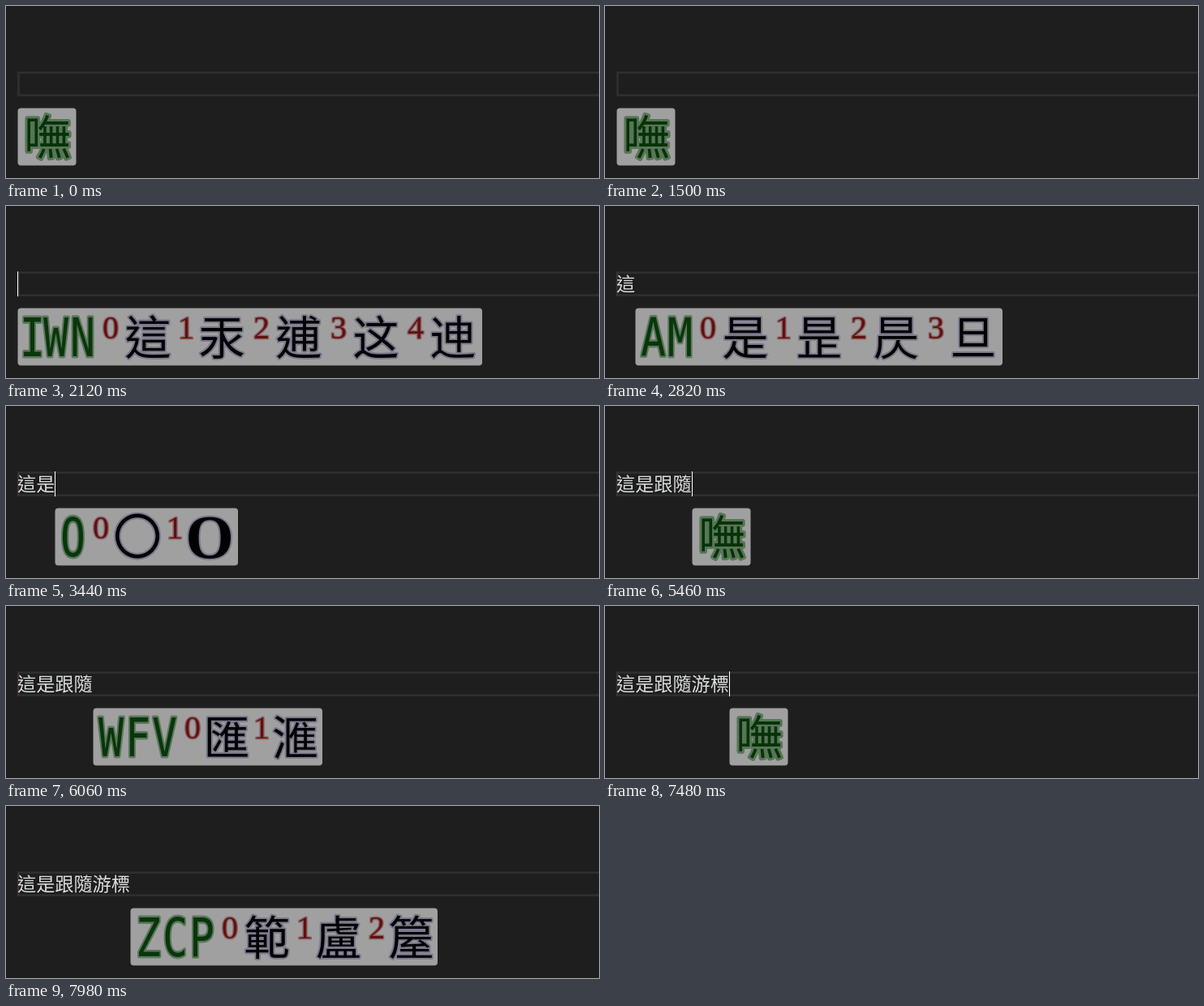
Animation of 731x213 px, one loop 8000 ms. Source, as an HTML page:

```html
<!DOCTYPE html>
<html lang="zh-Hant">
<head>
<meta charset="utf-8">
<style>
html, body { margin: 0; width: 100%; height: 100%; overflow: hidden; background: #1e1e1e; }
svg { display: block; width: 731px; height: 213px; }
text { paint-order: stroke; stroke-linejoin: round; }
.typed, .han { font-family: "Noto Sans CJK TC", "Noto Sans CJK", "Noto Sans CJK JP", sans-serif; }
.typed { font-size: 23.15px; font-weight: 300; fill: #dadddd; }
.han { font-size: 57px; font-weight: 500; fill: #020204; stroke: #7c7a8c; stroke-width: 4px; text-anchor: middle; }
.thin { font-size: 60px; font-weight: 300; }
.latin { font: bold 76px "Liberation Serif", serif; fill: #020204; stroke: #7c7a8c; stroke-width: 4px; text-anchor: middle; }
.idle { font-size: 58px; fill: #063306; stroke: #587558; stroke-width: 6px; }
.key { font: 66px "DejaVu Sans Mono", monospace; fill: #09360b; stroke: #5c775c; stroke-width: 5px; text-anchor: middle; }
.num { font: 40px "Liberation Serif", serif; fill: #620f11; stroke: #8a6666; stroke-width: 3px; text-anchor: middle; }
</style>
</head>
<body>
<svg viewBox="0 0 731 213">
  <rect width="731" height="213" fill="#1e1e1e"/>
  <path d="M740 82.5H15.5V110.5H740" fill="none" stroke="#303030" stroke-width="2.6"/>
  <rect id="edge" x="14" y="81" width="1" height="31" fill="#40342a"/>
  <text id="typed" class="typed" x="14" y="104.8"></text>
  <rect id="caret" y="81" width="1" height="31" fill="#fff"/>
  <g id="popup"></g>
</svg>
<script>
const LOOP = 8000, LEFT = 14, PITCH = 23.15;
const SENTENCE = '這是跟隨游標';

// Start time, committed characters, keys typed, candidates
const steps = [
  [0, 0, '', ''],
  [1720, 0, 'I', '工I'],
  [1920, 0, 'IW', '汞'],
  [2120, 0, 'IWN', '這汞逋这迧'],
  [2320, 1, '', ''],
  [2520, 1, 'A', '對A'],
  [2820, 1, 'AM', '是昰昃旦'],
  [3220, 2, '', ''],
  [3440, 2, 'O', '〇O'],
  [3640, 2, 'OZ', '足'],
  [3840, 2, 'OZX', '跟'],
  [3940, 2, 'OZXK', '跟踉'],
  [4340, 3, '', ''],
  [4540, 3, 'L', '力'],
  [5160, 3, 'LD', '隨'],
  [5460, 4, '', ''],
  [5760, 4, 'W', '水W'],
  [5860, 4, 'WF', '汸'],
  [6060, 4, 'WFV', '匯滙'],
  [6160, 4, 'WFVZ', '游遊'],
  [6660, 5, '', ''],
  [6980, 5, 'T', '木'],
  [7180, 5, 'TF', '標杯'],
  [7480, 6, '', ''],
  [7680, 6, 'Z', '竹Z'],
  [7880, 6, 'ZC', '範'],
  [7980, 6, 'ZCP', '範盧箼']
];
// The caret flips at each time, starting hidden
const flips = [100, 500, 1000, 1500, 2020, 2820, 3220, 3740, 4240, 4840,
  5460, 5960, 6460, 7180, 7480, 7980];
const inkWidth = { '匯': 52, '滙': 55, '盧': 56, '箼': 53, '範': 59, '〇': 58, 'O': 58 };

const $ = id => document.getElementById(id);
const label = (cls, x, y, s) => `<text class="${cls}" x="${x}" y="${y}">${s}</text>`;
const panel = (x, w) => `<rect x="${x + 0.5}" y="126.5" width="${w}" height="71" rx="4" fill="#a0a0a0"/>`;
const keyLabel = (x, s) =>
  `<text class="key" transform="translate(${x} 186) scale(.78 1)">${s}</text>`;

function candidate(x, s) {
  if (/[A-Z]/.test(s)) return label('latin', x, 187.5, s);
  return label(s === '〇' ? 'han thin' : 'han', x, 183.5, s);
}

function popup(left, keys, list) {
  if (!keys) return panel(left, 72) + label('han idle', left + 37, 184, '嘸');
  let x = left + 6, out = '';
  for (const k of keys) {
    const w = k === 'I' ? 25 : 33;
    out += keyLabel(x + w / 2, k);
    x += w;
  }
  x += 9;
  [...list].forEach((s, i) => {
    const d = i === 1 ? 14 : 18, w = inkWidth[s] || 60;
    if (i) x += 10;
    out += label('num', x + d / 2, 163.5, i);
    x += d + 7;
    out += candidate(x + w / 2, s);
    x += w;
  });
  return panel(left, x + 5.5 - left) + out;
}

let shown = null;
function draw(t) {
  const step = steps.filter(s => s[0] <= t).pop();
  $('caret').style.display = flips.filter(f => f <= t).length % 2 ? '' : 'none';
  if (step === shown) return;
  shown = step;
  const [, count, keys, list] = step;
  const x = Math.round(LEFT + PITCH * count);
  $('typed').textContent = SENTENCE.slice(0, count);
  $('edge').style.display = count ? '' : 'none';
  $('caret').setAttribute('x', x);
  $('popup').innerHTML = popup(x, keys, list);
}

const start = performance.now();
function tick() {
  draw((performance.now() - start) % LOOP);
  requestAnimationFrame(tick);
}
tick();
</script>
</body>
</html>
```
